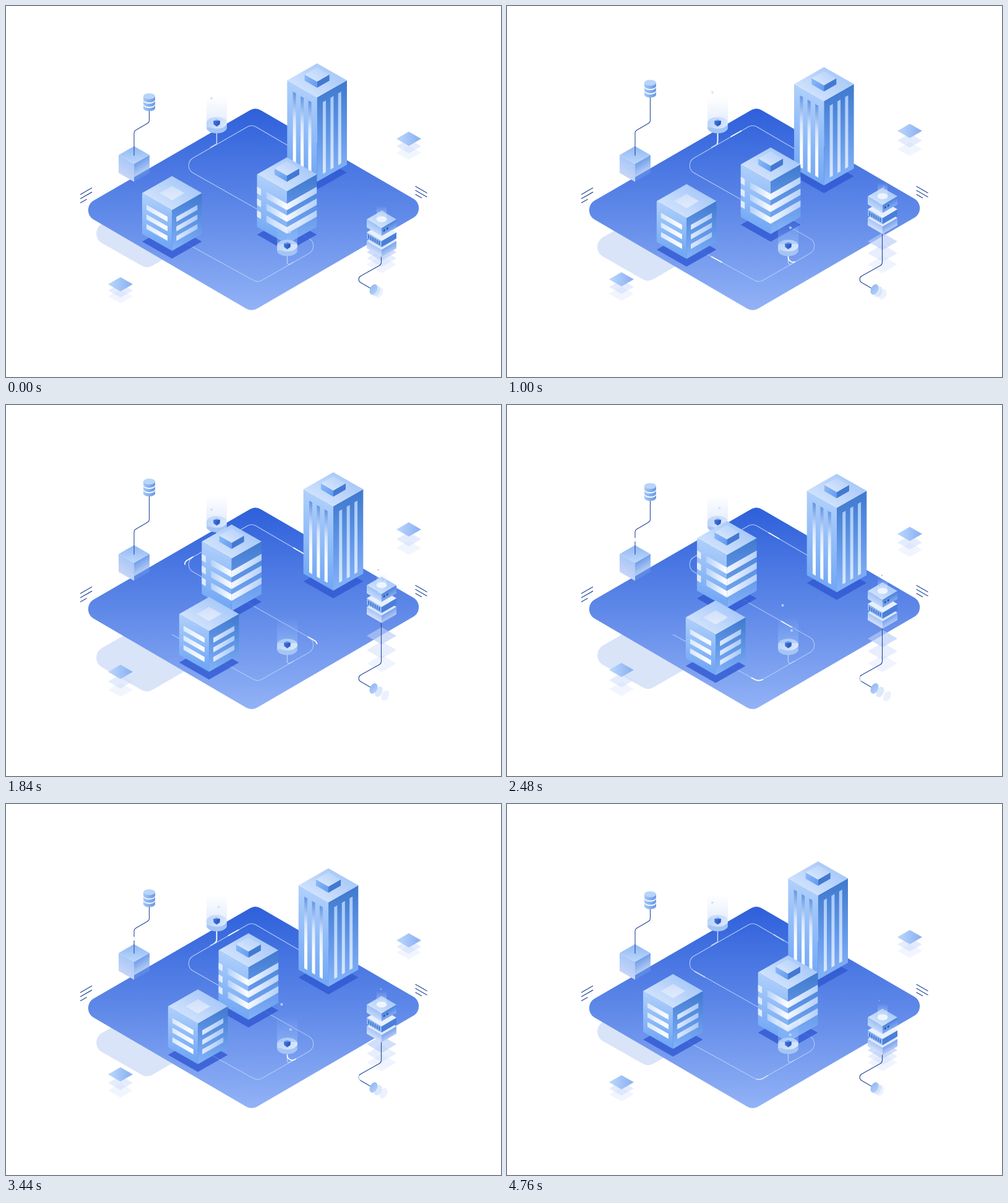
Recreate the animation shown at these times as an HTML page with a canvas. Size 800 by 600 pixels, loop 4800 ms.

```html
<!DOCTYPE html>
<html lang="en">
<head>
<meta charset="utf-8">
<title>Isometric city</title>
<style>
html, body { margin: 0; width: 100%; height: 100%; overflow: hidden; background: #fff; }
canvas { display: block; width: 800px; height: 600px; }
</style>
</head>
<body>
<canvas id="stage" width="800" height="600"></canvas>
<script>
const ctx = document.getElementById('stage').getContext('2d');
const LOOP = 4800, NAVY = '#24499c';

// ---- timing
const clamp = x => Math.max(0, Math.min(1, x));
const smooth = x => { x = clamp(x); return x * x * (3 - 2 * x); };
const upDown = (t, top, fall, end) =>
  t < top ? smooth(t / top) : 1 - smooth((t - fall) / (end - fall));
const glide = (t, power) => {
  const x = clamp((t < 2440 ? t / 2440 : (4760 - t) / 2320) - .012);
  return x < .5 ? .5 * (2 * x) ** power : 1 - .5 * (2 - 2 * x) ** power;
};
const wrap = (t, period) => ((t % period) + period) % period;

// ---- drawing helpers
function grad(x0, y0, x1, y1, ...colors) {
  const g = ctx.createLinearGradient(x0, y0, x1, y1);
  colors.forEach((c, i) => g.addColorStop(i / (colors.length - 1), c));
  return g;
}
function shape(points, fill, radius = 0) {
  const n = points.length, a = points[n - 1], b = points[0];
  ctx.beginPath();
  ctx.moveTo((a[0] + b[0]) / 2, (a[1] + b[1]) / 2);
  points.forEach((p, i) => ctx.arcTo(...p, ...points[(i + 1) % n], radius));
  ctx.closePath();
  ctx.fillStyle = fill;
  ctx.fill();
}
function rhomb(x, y, hw, hh, fill) {
  shape([[x, y - hh], [x + hw, y], [x, y + hh], [x - hw, y]], fill);
}
function oval(x, y, rx, ry, fill, turn = 0) {
  ctx.beginPath();
  ctx.ellipse(x, y, rx, ry, turn, 0, 7);
  ctx.fillStyle = fill;
  ctx.fill();
}
function route(points, radius) {
  const path = new Path2D();
  path.moveTo(...points[0]);
  for (let i = 1; i < points.length - 1; i++) path.arcTo(...points[i], ...points[i + 1], radius);
  path.lineTo(...points[points.length - 1]);
  return path;
}
function line(path, color, width = 1) {
  ctx.strokeStyle = color;
  ctx.lineWidth = width;
  ctx.stroke(path);
}
function streak(path, at, length, color, width) {
  ctx.save();
  ctx.setLineDash([length, 5000]);
  ctx.lineDashOffset = -at;
  line(path, color, width);
  ctx.restore();
}
// Draws in the skewed plane of a side wall; the origin is its upper left corner.
function wall(x, y, slope, draw) {
  ctx.save();
  ctx.transform(1, slope, 0, 1, x, y);
  draw();
  ctx.restore();
}
function rect(x, y, w, h, fill) {
  ctx.fillStyle = fill;
  ctx.fillRect(x, y, w, h);
}
function box(x, y, hw, hh, h, left, right, roof) {
  const k = hh / hw;
  wall(x - hw, y, k, () => rect(0, 0, hw, h, left));
  wall(x, y + hh, -k, () => rect(0, 0, hw, h, right));
  rhomb(x, y, hw, hh, roof);
}

// ---- buildings
const HW = 48.3, HH = 27.5, K = HH / HW;
const roofFill = (x, y, w, h) => grad(x + w * .4, y - h, x - w * .3, y + h, '#a3c6f8', '#d3e4fd');

function building(x, y, h, leftWall, rightWall) {
  rhomb(x, y + h + 12.5, HW, HH, 'rgba(48,88,210,.8)');
  box(x, y, HW, HH, h,
    grad(0, 0, HW * .6, h, '#b0d0fb', '#72a8f5'),
    grad(HW, 0, 0, h, '#3f79cd', '#5f95e6', '#83b2f8'),
    roofFill(x, y, HW, HH));
  wall(x - HW, y, K, leftWall);
  wall(x, y + HH, -K, rightWall);
}
function roofBox(x, y) {
  box(x, y - 9.5, 20, 11.5, 10, grad(0, 0, 20, 8, '#8db9f8', '#629cf0'), '#4379d2',
    grad(x + 8, y - 22, x - 8, y + 2, '#b5d1fa', '#d6e6fd'));
}
function lowHouse(x, y) {
  const bands = (u, fill) => { for (let i = 0; i < 3; i++) rect(u, 15 + i * 15.5, 34, 8, fill); };
  building(x, y, 66,
    () => bands(7, grad(7, 0, 41, 0, '#d9e8fd', '#fff')),
    () => bands(7, grad(7, 0, 41, 0, '#ddeafe', '#a9c9f8')));
  rhomb(x, y, 20, 11.5, grad(x, y - 11, x, y + 11, '#d0e0fb', '#e2ebfc'));
}
function midHouse(x, y) {
  building(x, y, 85,
    () => {
      for (let v = 20; v < 60; v += 19) {
        rect(0, v, 6.5, 10.5, '#dfebfd');
        rect(15, v, HW - 15, 10.5, grad(15, 0, HW, 0, '#b5d2fb', '#fff'));
      }
    },
    () => {
      for (let v = 20; v < 60; v += 19)
        rect(0, v, HW, 10.5, grad(0, 0, HW, 0, '#f4f8ff', '#b5d0fa'));
    });
  roofBox(x, y);
}
function tower(x, y) {
  const bars = fill => { for (let i = 0; i < 3; i++) rect(9.3 + i * 12.4, 13, 5, 116, fill); };
  building(x, y, 136.5,
    () => bars(grad(0, 13, 0, 100, '#6497e2', '#d5e5fd', '#fff')),
    () => bars(grad(0, 13, 0, 129, '#a6c9fa', '#d9e7fd')));
  roofBox(x, y);
}

// ---- ground
const stem1 = [340.5, 203], stem2 = [454.5, 402];
const road = route([[530, 269], [397, 191.5], [281, 258], [511, 388], [407, 447.5], [268, 371]], 14);
const lane = {
  left: route([stem1, [340.5, 223], [281, 258], [420, 337]], 8),
  top: route([[494, 248], [397, 191.5], [350, 218]], 14),
  right: route([stem2, [454.5, 420], [511, 388], [396, 323]], 8),
  bottom: route([[454, 421], [407, 447.5], [290, 383]], 14)
};
function ground(t) {
  const d = 41 * upDown(t, 1920, 1920, 4720);
  shape([[128, 368 + d], [228, 425 + d], [378, 338 + d], [278, 281 + d]], '#d9e4f9', 18);
  shape([[403, 163.5], [685, 327], [397, 494.5], [115, 330]],
    grad(0, 167, 0, 491, '#2e60da', '#5e88e8', '#92b2f6'), 18);
  line(road, '#b2caf8', 1.1);
  line(route([stem1, [340.5, 223], [330, 229]], 3), '#d4e2fb', 1.4);
  line(route([stem2, [454.5, 420], [465, 414]], 3), '#c4d7fa', 1.2);
  const beat = wrap(t, 2400);
  ctx.globalAlpha = clamp(Math.min(beat, 2400 - beat) / 70);
  const run = (path, start, speed) => {
    const age = wrap(t - start, 2400);
    if (age < 2200) streak(path, age * speed, 20, '#fff', 1.7);
  };
  run(lane.left, 1000, .075);
  run(lane.top, 1650, .075);
  run(lane.right, 1000, .08);
  run(lane.bottom, 1900, .08);
  ctx.globalAlpha = 1;
}

// ---- small parts
function dot(t, start, life, x, y, speed, r, color) {
  const age = wrap(t - start, 960);
  if (age > life) return;
  ctx.globalAlpha = Math.min(1, (life - age) / 80);
  oval(x, y - age * speed, r, r, color);
  ctx.globalAlpha = 1;
}
function beacon(x, y) {
  oval(x, y + 7.5, 16.5, 9.5, '#a4c5f5');
  rect(x - 16.5, y, 33, 7.5, grad(x - 16, 0, x + 16, 0, '#bcd5fa', '#97bbf1'));
  oval(x, y, 16.5, 9.5, grad(x - 12, y - 8, x + 12, y + 8, '#b9d3f9', '#d9e7fd'));
  shape([[x, y - 5.5], [x + 5.5, y - 3.5], [x + 5, y + 2.5], [x, y + 6], [x - 5, y + 2.5], [x - 5.5, y - 3.5]],
    grad(x - 5, 0, x + 5, 0, '#3f74dc', '#2453bf'));
}
function glow(x, y, h, tint, alpha) {
  rect(x - 16.5, y - h, 33, h, grad(0, y - h, 0, y, `rgba(${tint},0)`, `rgba(${tint},${alpha})`));
}
function tile(x, ys) {
  rhomb(x, ys[2], 20, 11.5, 'rgba(225,232,252,.45)');
  rhomb(x, ys[1], 20, 11.5, 'rgba(208,221,251,.55)');
  rhomb(x, ys[0], 20, 11.5, grad(x - 15, ys[0], x + 15, ys[0], '#b5d3fa', '#8eb3f3'));
}
function dashes(x, y, dir) {
  [19, 19, 10.5].forEach((w, i) =>
    line(route([[x, y + i * 6.8], [x + dir * w, y + i * 6.8 - w * .575]], 0), NAVY, 1.2));
}
function database(t) {
  const y = 146 - 24.5 * upDown(t, 1260, 1300, 4080), x = 231.5;
  box(207, 241, 25, 14.3, 29,
    grad(0, 0, 0, 29, '#a9c7f8', '#c7d5f7'),
    grad(0, 0, 0, 29, '#709eea', 'rgba(112,158,234,.35)'),
    grad(207, 227, 207, 255, '#8fb8f4', '#bcd7fb'));
  const cable = route([[x, y + 20], [x, 188], [207, 202.5], [207, 242]], 5);
  line(cable, NAVY, 1.1);
  const phase = wrap(t, 960);
  if (phase > 160 && phase < 660)
    streak(cable, 167 - y - 20 + 78 * ((phase - 160) / 480) ** 1.4, 6, '#fff', 1.8);
  const body = grad(x - 9.5, 0, x + 9.5, 0, '#a5c8f8', '#6796e4');
  [14, 7, 0].forEach(off => {
    if (off < 14) oval(x, y + off + 7, 9.5, 4.8, '#fff');
    oval(x, y + off + 5.3, 9.5, 4.8, body);
    rect(x - 9.5, y + off, 19, 5.3, body);
    oval(x, y + off, 9.5, 4.8, '#b8d4fa');
  });
}
function server(t) {
  const d = 54.5 * upDown(t, 1600, 1600, 4760), x = 607, y = 345 - d;
  rhomb(x, 418, 24, 14, 'rgba(222,230,252,.45)');
  rhomb(x, 408 - .22 * d, 24, 14, 'rgba(208,221,251,.5)');
  rhomb(x, 398 - .46 * d, 24, 14, 'rgba(184,204,248,.65)');

  const cable = route([[606.5, y + 58], [606.5, 418], [564, 442], [590, 457]], 6);
  line(cable, NAVY, 1.1);
  const phase = wrap(t, 960);
  if (phase > 240 && phase < 700) streak(cable, 40 + d + (phase - 360) * .29 - 43, 9, '#c9daf7', 1.5);

  box(x, y + 35, 24, 14, 12, grad(0, 0, 0, 12, '#a7c4f7', '#d5e0fb'),
    grad(0, 0, 0, 12, '#78a3ee', '#b4c8f5'), '#dce8fd');
  box(x, y + 21, 24, 14, 10, '#8bb6f6', '#4a7fda', '#e8f0fe');
  wall(x - 24, y + 21, 14 / 24, () => {
    for (let i = 0; i < 6; i++) rect(2.5 + i * 3.4, 2.5, 1.5, 6, '#3264bd');
  });
  box(x, y, 24, 14, 13, grad(0, 0, 0, 13, '#9dc1f7', '#c5d9fb'),
    grad(0, 0, 0, 13, '#4b82db', '#83abf1'), roofFill(x, y, 24, 14));
  wall(x, y + 14, -14 / 24, () => {
    rect(3, 5, 2.5, 3, '#244f9f');
    rect(8, 5, 2.5, 3, '#244f9f');
  });
  rect(x - 8, y - 22, 16, 22, grad(0, y - 22, 0, y, 'rgba(220,232,253,0)', 'rgba(220,232,253,.6)'));
  oval(x, y, 8.3, 4.8, '#eff5ff');
  [[601.5, 560], [609, 880], [606, 240]].forEach(([dx, start]) =>
    dot(t, start, 400, dx, y - 9, .05, 1.2, '#a4c3f3'));
}
function coins(t) {
  const p = upDown(t, 2400, 2400, 4800);
  oval(603 + 11.5 * p, 463.5 + 7.5 * p, 5.8, 9, 'rgba(220,231,252,.55)', .45);
  oval(598.5 + 4.5 * p, 461 + 3 * p, 5.8, 9, 'rgba(198,216,250,.6)', .45);
  oval(594, 458.5, 5.8, 9, grad(588, 452, 600, 466, '#8fb7f2', '#b7d2f8'), .45);
}

function draw(t) {
  ctx.clearRect(0, 0, 800, 600);
  rect(0, 0, 800, 600, '#fff');
  ground(t);
  database(t);
  dashes(120, 305, 1);
  [19, 19, 10.5].forEach((w, i) =>
    line(route([[661.5, 291.5 + i * 6.5], [661.5 + w, 291.5 + i * 6.5 + w * .575]], 0), NAVY, 1.2));

  beacon(340.5, 189);
  glow(340.5, 186, 40, '205,222,251', .5);
  [[332, 800], [343.5, 470], [351.5, 170]].forEach(([x, start]) =>
    dot(t, start, 270, x, 189, .245, 2, '#d3e1f8'));

  const slow = glide(t, 2), fast = glide(t, 2.5);
  tower(502.7 + 30.3 * slow, 120.3 + 18.5 * slow);
  midHouse(454 - 98.7 * fast, 272.3 - 57 * fast);
  lowHouse(268.3 + 69 * slow, 302.5 + 41 * slow);

  beacon(454.5, 387.5);
  glow(454.5, 385, 42, '150,190,248', .5);
  [[458, 900], [445.5, 270], [460, 510]].forEach(([x, start], i) =>
    dot(t, start, i === 2 ? 150 : 460, x, 377, i === 2 ? .24 : .182, 2.1, 'rgba(190,215,252,.85)'));

  const sink = 21.5 * upDown(t, 2400, 2400, 4800);
  tile(185, [450 - sink, 460 - .7 * sink, 469.5 - .48 * sink]);
  const sway = Math.sin(2 * Math.PI * (t - 260) / LOOP);
  tile(651, [211 - 11 * sway, 224 - 8 * sway, 235.5 - 5 * sway]);
  server(t);
  coins(t);
}

function frame() {
  draw(performance.now() % LOOP);
  requestAnimationFrame(frame);
}
frame();
</script>
</body>
</html>
```
